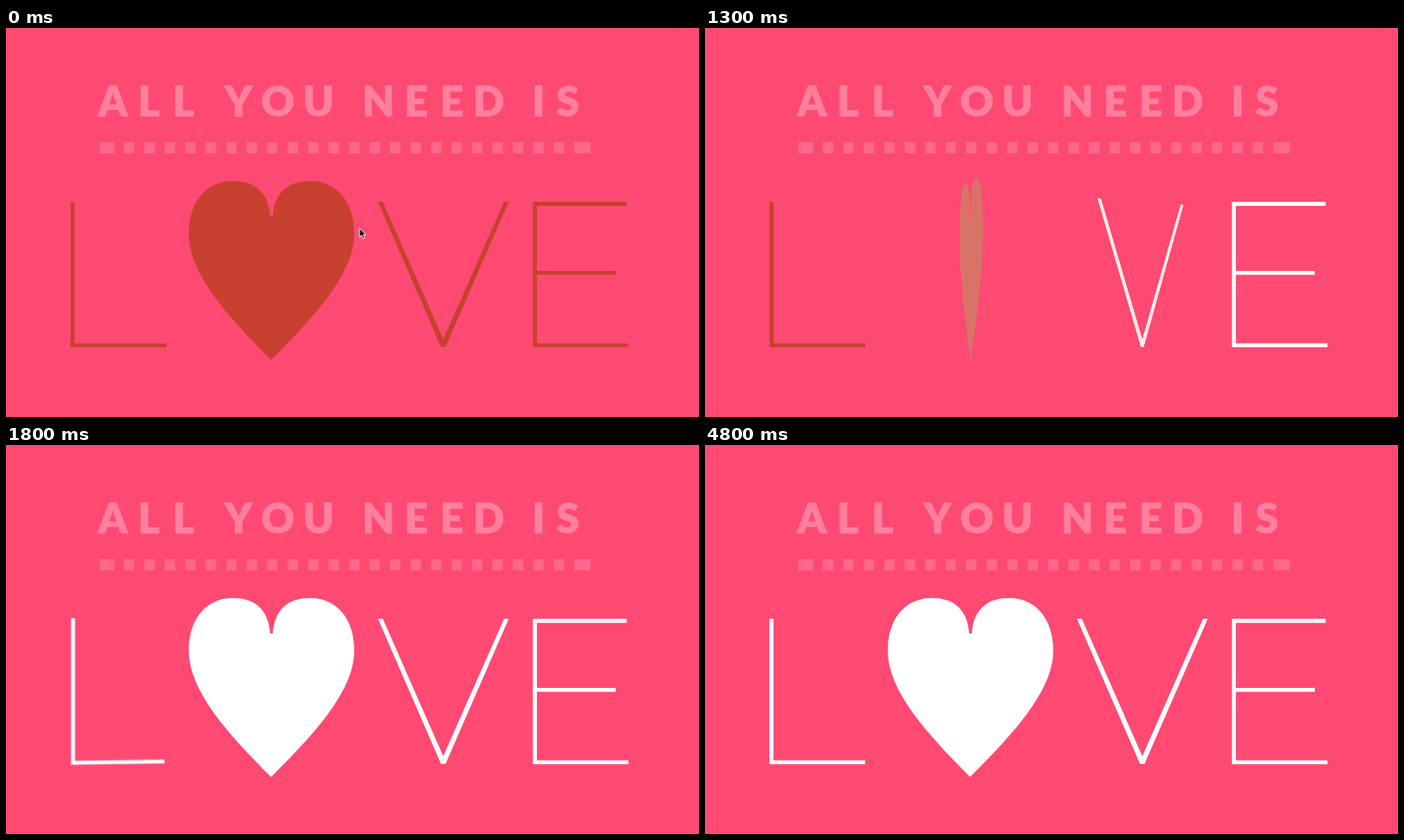
Recreate the animation shown at these times as an HTML page. Size 800 by 450 pixels, loop 4900 ms.

```html
<!DOCTYPE html>
<html lang="en">
<head>
<meta charset="utf-8">
<title>All you need is love</title>
<style>
  html, body { margin: 0; width: 100%; height: 100%; overflow: hidden; background: #fe4a72; }
  #stage { position: relative; width: 800px; height: 450px; overflow: hidden; contain: strict; }
  svg { position: absolute; left: 0; top: 0; width: 800px; height: 450px; overflow: hidden; }
  text { font: 900 47.5px Lato, "Open Sans", sans-serif; fill: #ff7f9f; stroke: #ff7f9f; stroke-width: .8; }
  #dashes { fill: #ff678b; }
  .line { fill: none; stroke: currentColor; stroke-width: 4.6; }
  .solid { fill: currentColor; }
  .letter { color: #c8402f; }
</style>
</head>
<body>
<div id="stage">
  <svg viewBox="0 0 800 450">
    <text y="102" x="106.5 152.5 192.5">ALL</text>
    <text y="102" x="252.5 294.5 343">YOU</text>
    <text y="102" x="411.5 460 501 539">NEED</text>
    <text y="102" x="607.5 635.5">IS</text>
    <g id="dashes"></g>
  </svg>

  <svg class="letter" id="L" viewBox="0 0 800 450"><path class="line" d="M76.8 201V367H185"/></svg>
  <svg class="letter" id="O" viewBox="0 0 800 450"><path class="solid" d="M305 218C303 190 287 177 262 177C232 177 211 200 211 238C211 285 258 336 306 384C354 336 402 285 402 238C402 200 381 177 351 177C326 177 310 190 308 218Z"/></svg>
  <svg class="letter" id="V" viewBox="0 0 800 450"><path class="solid" d="M429.4 201H435L504.8 360L575 201H580.4L507.4 369H502.2Z"/></svg>
  <svg class="letter" id="E" viewBox="0 0 800 450"><path class="line" d="M716.5 203.4H610.6V367H718.5M610.6 283.3H704"/></svg>

  <svg id="cursor" viewBox="0 0 800 450">
    <path d="M0 0V10.5L2.4 8.4L4.2 12.2L6 11.4L4.4 7.6H7.4Z" fill="#111" stroke="#fff" stroke-width=".9"/>
  </svg>
</div>

<script>
const LOOP = 4900, STEP = 100;
const RED = [200, 64, 47];
const $ = id => document.getElementById(id);

// Pose at each step of a flip: turn in degrees, and share of white.
const turn = [0, 40, 82, 104, 131, 168, 180];
const white = [0, .1, .27, .58, .89, .98, 1];

const letters = [
  { el: $('E'), axis: 657.6, start: 700 },
  { el: $('V'), axis: 505, start: 900 },
  { el: $('O'), axis: 306.3, start: 1100 },
  { el: $('L'), axis: 119.8, start: 1300 }
];
for (const { el, axis } of letters) el.style.transformOrigin = `${axis}px 284px`;

function addDash(x, width) {
  const r = document.createElementNS('http://www.w3.org/2000/svg', 'rect');
  Object.entries({ x, y: 132, width, height: 13 }).forEach(([k, v]) => r.setAttribute(k, v));
  $('dashes').append(r);
}
addDash(108, 17);
for (let i = 0; i < 22; i++) addDash(136 + i * 23.64, 12);
addDash(656, 19);

function pose({ el, start }, t) {
  const i = Math.max(0, Math.min(turn.length - 1, (t - start) / STEP));
  const a = turn[i];
  // Past the edge the back shows, unmirrored.
  const shown = a < 90 ? -a : 180 - a;
  el.style.transform = shown ? `perspective(1300px) rotateY(${shown}deg)` : 'none';
  el.style.color = `rgb(${RED.map(c => Math.round(c + (255 - c) * white[i]))})`;
}

function draw(now) {
  const t = Math.floor((now % LOOP) / STEP) * STEP;
  letters.forEach(l => pose(l, t));
  const cursor = $('cursor');
  cursor.style.display = t < 700 ? '' : 'none';
  cursor.firstElementChild.setAttribute('transform', t < 600 ? 'translate(408 231.5)' : 'translate(383.5 89.5)');
}

const begin = performance.now();
(function frame() {
  draw(performance.now() - begin);
  requestAnimationFrame(frame);
})();
</script>
</body>
</html>
```
